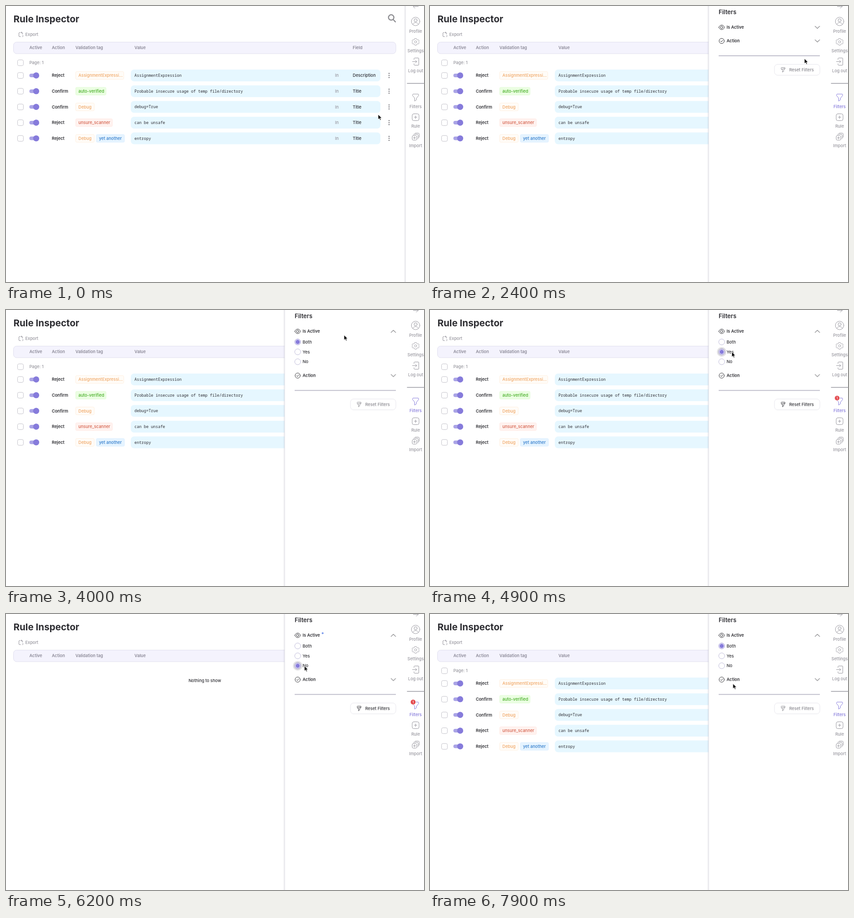
Write an HTML page that moves like this. It is 921 px wide and 608 px high and loops after 8000 ms.

```html
<!DOCTYPE html>
<html lang="en">
<head>
<meta charset="utf-8">
<title>Rule list</title>
<style>
html, body { margin: 0; width: 100%; height: 100%; overflow: hidden; background: #fff; }
svg { display: block; font: 500 9.2px Inter, "Open Sans", sans-serif; fill: #2d2d32; }
.title { font-size: 20.6px; font-weight: 700; }
.bold { font-weight: 600; }
.mono { font: 500 8.67px "Roboto Mono", "Noto Sans Mono", monospace; }
.muted { fill: #96959d; }
.mid { text-anchor: middle; }
.line { fill: none; stroke: currentColor; stroke-linecap: round; stroke-linejoin: round; }
.side { color: #98979f; }
.side text { fill: currentColor; text-anchor: middle; }
.dark { color: #2d2d32; }

/* one shared 8 s clock; 1% = 80 ms */
.a { animation: 8s ease-in-out infinite; }
.s { animation: 8s step-end infinite; }

#filterItem { animation-name: tint; }
@keyframes tint { 0% { color: #98979f } 11.9%, 100% { color: #857adb } }
#hover { animation-name: hover; }
@keyframes hover { 0%, 27% { opacity: 0 } 11.9% { opacity: 1 } 100% { opacity: 0 } }
#back { animation-name: back; }
@keyframes back { 0% { transform: none } 25% , 100% { transform: scaleX(-1) } }

#panel { animation-name: slide; }
@keyframes slide { 0%, 23.6% { transform: translateX(266px) } 27.5%, 100% { transform: none } }
#actionHead { animation-name: head; }
@keyframes head { 0%, 46% { transform: none } 49.5%, 100% { transform: translateY(67.5px) } }
#actionBody { animation-name: body; }
@keyframes body { 0%, 36.5% { opacity: 0 } 39.5%, 46% { opacity: 1 } 48%, 100% { opacity: 0 } }
#actionChev { animation-name: flip; }
@keyframes flip { 0%, 36.5% { transform: none } 39.5%, 46% { transform: scaleY(-1) } 49.5%, 100% { transform: none } }
#activeChev { animation-name: open; }
@keyframes open { 0%, 46% { transform: none } 49.5%, 100% { transform: scaleY(-1) } }
#radios { animation-name: reveal; }
@keyframes reveal { 0%, 47% { opacity: 0 } 49.5%, 100% { opacity: 1 } }
#foot { animation-name: foot; }
@keyframes foot {
  0%, 36.5% { transform: none }
  39.5%, 46% { transform: translateY(48.5px) }
  49.5%, 100% { transform: translateY(67.5px) }
}

#pick { animation-name: pick; }
@keyframes pick {
  0% { transform: none } 60% { transform: translateY(21.8px) }
  76.3% { transform: translateY(43.6px) } 93.2%, 100% { transform: none }
}
#halo { animation-name: halo; }
@keyframes halo {
  0% { opacity: 0; transform: none }
  58.5% { opacity: 1; transform: translateY(21.8px) }
  66% { opacity: 0 }
  70% { opacity: 1; transform: translateY(43.6px) }
  82.6% { opacity: 0 }
  85.6% { opacity: 1; transform: none }
  94.5%, 100% { opacity: 0; transform: none }
}
#badge { animation-name: badge; }
@keyframes badge {
  0%, 60% { transform: scale(0) } 61.5%, 94% { transform: scale(1) } 96%, 100% { transform: scale(0) }
}
#mark { animation-name: mark; }
@keyframes mark { 0% { opacity: 0 } 62.5% { opacity: 1 } 95.5%, 100% { opacity: 0 } }
#reset { animation-name: reset; }
@keyframes reset { 0% { color: #85848b } 60.5% { color: #2d2d32 } 95.5%, 100% { color: #85848b } }
#rows { animation-name: rows; }
@keyframes rows { 0% { opacity: 1 } 77.5% { opacity: 0 } 95%, 100% { opacity: 1 } }
#empty { animation-name: empty; }
@keyframes empty { 0% { opacity: 0 } 77.5% { opacity: 1 } 95%, 100% { opacity: 0 } }

#cursor { animation-name: path; }
@keyframes path {
  0%, 1% { transform: translate(820px, 239px) }
  11.5%, 24.5% { transform: translate(902px, 201.5px) }
  33.5%, 37.5% { transform: translate(790px, 77px) }
  43.5%, 46.5% { transform: translate(764.5px, 47px) }
  57.5% { transform: translate(672px, 86px) }
  61%, 64% { transform: translate(665px, 92.5px) }
  71%, 81% { transform: translate(657.5px, 114.5px) }
  87.5%, 93.5% { transform: translate(649px, 67.5px) }
  98.5%, 100% { transform: translate(667.5px, 153.5px) }
}
#arrow { animation-name: arrow; }
@keyframes arrow { 0% { opacity: 1 } 11.9% { opacity: 0 } 25% { opacity: 1 } 85.6% { opacity: 0 } 94.5%, 100% { opacity: 1 } }
#resize { animation-name: resize; }
@keyframes resize { 0% { opacity: 0 } 11.9% { opacity: 1 } 25%, 100% { opacity: 0 } }
#hand { animation-name: hand; }
@keyframes hand { 0% { opacity: 0 } 85.6% { opacity: 1 } 94.5%, 100% { opacity: 0 } }
</style>
</head>
<body>
<svg width="921" height="608" viewBox="0 0 921 608">
  <defs>
    <linearGradient id="shade">
      <stop offset="0" stop-color="#404060" stop-opacity="0"/>
      <stop offset="1" stop-color="#404060" stop-opacity=".1"/>
    </linearGradient>
    <path id="funnel" d="M-6.5-6.5q0-1 1-1h11q1 0 1 1V-4L2 1.5V5L-2 8V1.5L-6.5-4Z"/>
    <path id="chevron" d="M-5-2.6 0 2.6 5-2.6"/>
  </defs>

  <text class="title" x="16.5" y="36">Rule Inspector</text>
  <g class="line" color="#8f8f93" stroke-width="2.5">
    <circle cx="848.7" cy="25.2" r="5.9"/><path d="m853.3 30 4.6 4.8"/>
  </g>
  <g class="line" color="#929199">
    <path d="M31 58.5h-1q-1.5 0-1.5 1.5v6q0 1.500 1.500 1.500h2M33 58.500h2q1.500 0 1.500 1.500v2M36.500 64.500l1.500 1.500-2 2M34 57v3"/>
  </g>
  <text class="muted" x="42.500" y="66.400">Export</text>
  <rect x="16.500" y="79.500" width="842.500" height="25.500" rx="7" fill="#f4f3fd" stroke="#e0dfee"/>
  <g class="bold" fill="#8c8a98">
    <text x="51.500" y="95.200">Active</text><text x="101" y="95.200">Action</text>
    <text x="153" y="95.200">Validation tag</text><text x="283" y="95.200">Value</text>
    <text x="764" y="95.200">Field</text>
  </g>
  <g id="rows" class="s"></g>
  <text id="empty" class="s mid" x="438" y="149.700">Nothing to show</text>

  <g id="panel" class="a">
    <rect x="610" width="4" height="608" fill="url(#shade)"/>
    <rect x="614" width="320" height="608" fill="#fff"/>
    <path d="M614 0V608" stroke="#dcdbe2"/>
    <text class="bold" x="636" y="18.300" font-size="13">Filters</text>

    <g class="line dark">
      <path d="M636.500 47q2-5 6.200-5t6.200 5q-2 5-6.200 5t-6.200-5Z"/><circle cx="642.700" cy="47" r="2.600"/>
    </g>
    <text class="bold" x="653.500" y="50.300">Is Active</text>
    <circle id="mark" class="s" cx="697.700" cy="42.300" r="2.100" fill="#7e9cec"/>
    <g transform="translate(853.500 47)"><use id="activeChev" class="a line dark" href="#chevron"/></g>

    <g id="radios" class="a">
      <g fill="#fff" stroke="#bdbad8">
        <circle cx="642.700" cy="70.400" r="6.500"/><circle cx="642.700" cy="92.200" r="6.500"/><circle cx="642.700" cy="114" r="6.500"/>
      </g>
      <g id="halo" class="s">
        <circle cx="642.700" cy="70.400" r="10.500" fill="#3c3850" opacity=".16"/>
        <circle cx="642.700" cy="70.400" r="6.500" fill="#c8c6ce" stroke="#aaa8b4"/>
      </g>
      <g id="pick" class="s">
        <circle cx="642.700" cy="70.400" r="6.300" fill="#f2f0fc" stroke="#a49cdf"/>
        <circle cx="642.700" cy="70.400" r="4.600" fill="#867bdb"/>
      </g>
      <text x="653.500" y="73.700">Both</text><text x="653.500" y="95.500">Yes</text><text x="653.500" y="117.300">No</text>
    </g>

    <g id="actionHead" class="a">
      <g class="line dark"><circle cx="642.700" cy="77" r="5.700"/><path d="m640 77 2 2 3.500-3.800"/></g>
      <text class="bold" x="653.500" y="80.300">Action</text>
      <g transform="translate(853.500 77)"><use id="actionChev" class="a line dark" href="#chevron"/></g>
    </g>
    <g id="actionBody" class="a">
      <text class="bold" x="636.500" y="101" font-size="7.300">Do</text>
      <rect x="636.500" y="107.500" width="222.500" height="24" rx="6.500" fill="#fff" stroke="#e3e2e8"/>
      <path class="line" color="#c4c3ca" d="m844 118 3 3 3-3"/>
    </g>

    <g id="foot" class="a">
      <path d="M636 109.700H859" stroke="#9d9aaf" stroke-width="1.200"/>
      <g id="reset" class="s">
        <rect x="759" y="128.500" width="100" height="24" rx="7" fill="#fff" stroke="#e6e5ec"/>
        <g class="line" transform="translate(778 140.500)">
          <use href="#funnel" transform="scale(.65)" stroke-width="1.500"/><path d="M-3.500-1 4-2.500"/>
        </g>
        <text x="791.500" y="143.800" fill="currentColor">Reset Filters</text>
      </g>
    </g>
  </g>

  <g class="side">
    <rect x="881" width="40" height="608" fill="#fff"/>
    <rect id="hover" class="s" x="881" y="189" width="40" height="43" fill="#f4f2fd"/>
    <g class="line">
      <g transform="translate(902.500 1)"><path id="back" class="s" d="M5.500 0H-5.500M-1.500-4-5.500 0l4 4"/></g>
      <g transform="translate(902.500 34)">
        <circle r="9.300"/><circle cy="-2.500" r="3.400"/><path d="M-6 6.500q1.500-4 6-4t6 4"/>
      </g>
      <g transform="translate(902.500 79) scale(.86)">
        <path d="M-2-8.500h4l.8 2.200 2.200 1.200 2.300-.4 2 3.400-1.500 1.900v.4l1.500 1.900-2 3.400-2.300-.4-2.200 1.200-.8 2.200h-4l-.8-2.200-2.200-1.200-2.300.4-2-3.400 1.500-1.900v-.4l-1.500-1.900 2-3.400 2.300.4 2.200-1.200Z"/>
        <circle r="2.800"/>
      </g>
      <path d="M899 118v-2q0-1.500 1.500-1.500h7.500q1.500 0 1.500 1.500v13q0 1.500-1.500 1.500h-7.500q-1.500 0-1.500-1.500v-2M895.500 122.500h9.500M902 119.500l3 3-3 3"/>
      <path d="M884 170.500H921" stroke-width="1.300"/>
      <path d="M902.500 242v6M899.500 245h6"/><rect x="895" y="237.500" width="15" height="15" rx="3.500"/>
      <rect x="895" y="285.500" width="10" height="10" rx="2.500"/><path d="M900 288v5M897.500 290.500h5"/>
      <path d="M898 283.500q0-1 1-1h7q2 0 2 2v7q0 1.500-1 1.500M901 281q0-1 1-1h6q2.500 0 2.500 2.500v5.500q0 1.500-1 1.500"/>
    </g>
    <text x="902.500" y="58.900">Profile</text><text x="902.500" y="102.200">Settings</text>
    <text x="902.500" y="145.500">Log out</text>
    <text x="902.500" y="268">Rule</text><text x="902.500" y="311.200">Import</text>
    <g id="filterItem" class="s">
      <use class="line" href="#funnel" x="902.500" y="201.500"/>
      <text x="902.500" y="224.800">Filters</text>
    </g>
    <g transform="translate(897 194)">
      <g id="badge" class="a">
        <circle r="5.800" fill="#e34b50" stroke="#fff" stroke-width=".8"/>
        <text y="2.500" font-size="7" style="fill:#fff">1</text>
      </g>
    </g>
  </g>

  <g id="cursor" class="a" stroke="#fff" fill="#000" stroke-width=".8" stroke-linejoin="round">
    <path id="arrow" class="s" d="M0 0V11L2.600 8.600 4.400 12.600 6.200 11.800 4.500 7.900H8Z"/>
    <path id="resize" class="s" d="M-6 0-2.500-3.500V-1h5v-2.500L6 0 2.500 3.500V1h-5v2.500Z"/>
    <path id="hand" class="s" fill="#fff" stroke="#000" d="M-1 1q0-1.300 1-1.300T1 1V5q.2-1 1.200-.8t1 1.100q.4-.8 1.300-.5t.9 1.200q.3-.6 1-.3t.7 1.200v2.600l-1 3.500H.5l-3-4.500q-1.500-2-.5-2.500t2 1.200Z"/>
  </g>
</svg>
<script>
const tints = {
  orange: ["#f0a766", "#fffcf8", "#fff0e0"],
  green: ["#45ad25", "#ebfee2", "#e4fbd9"],
  red: ["#d4604b", "#fff2ef", "#ffebe6"],
  blue: ["#2f7bcb", "#e6f4ff", "#dceeff"]
};
const rules = [
  ["Reject", "AssignmentExpression", "Description", ["AssignmentExpressi…", "orange", 153, 107]],
  ["Confirm", "Probable insecure usage of temp file/directory", "Title", ["auto-verified", "green", 153, 68]],
  ["Confirm", "debug=True", "Title", ["Debug", "orange", 153, 42]],
  ["Reject", "can be unsafe", "Title", ["unsure_scanner", "red", 153, 82]],
  ["Reject", "entropy", "Title", ["Debug", "orange", 153, 42], ["yet another", "blue", 198.5, 63]]
];

const text = (x, y, label, attrs = "") => `<text x="${x}" y="${y}" ${attrs}>${label}</text>`;
const checkbox = y => `<rect x="25.5" y="${y - 6.3}" width="12.8" height="12.8" rx="3" fill="#fff" stroke="#c3c2ca"/>`;

function tag([label, tint, x, width]) {
  const [ink, fill, edge] = tints[tint];
  return `<rect x="${x + .5}" y="-8.5" width="${width - 1}" height="17" rx="2.5" fill="${fill}" stroke="${edge}"/>` +
    text(x + 6.5, 3.3, label, `fill="${ink}"`);
}

function row([action, value, field, ...tags], i) {
  const dots = [-4.4, 0, 4.4].map(y => `<circle cx="844" cy="${y}" r="1.25" fill="#77767c"/>`).join("");
  return `<g transform="translate(0 ${153 + i * 34.65})">${checkbox(0)}
    <rect x="51.5" y="-4" width="20" height="8" rx="4" fill="#aaa4e6"/>
    <circle cx="66.5" r="6.7" fill="#867bdb"/>
    ${text(101, 3.2, action, 'class="bold"')}${tags.map(tag).join("")}
    <rect x="275" y="-13" width="550" height="26" rx="7" fill="#e6f7ff"/>
    ${text(283, 3, value, 'class="mono"')}${text(725, 3.2, "In", 'class="muted"')}
    ${text(764, 3.2, field)}${dots}</g>`;
}

document.getElementById("rows").innerHTML =
  checkbox(125) + text(51.5, 128.2, "Page: 1", 'class="muted"') + rules.map(row).join("");
</script>
</body>
</html>
```
